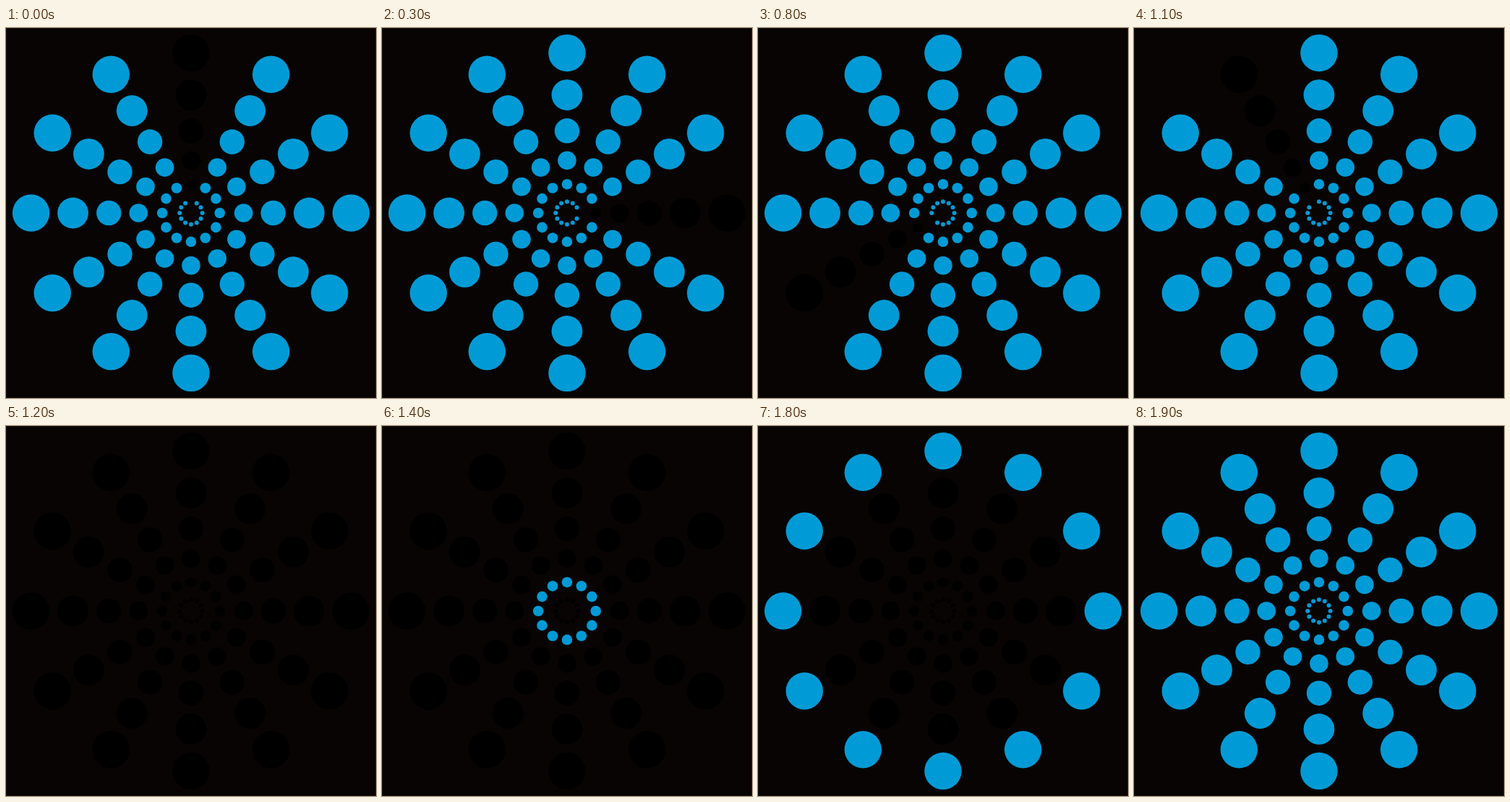
Animation of 512x512 px, one loop 2000 ms. Source, as an HTML page:

```html
<!DOCTYPE html>
<html lang="en">
<head>
<meta charset="utf-8">
<title>Dot rosette</title>
<style>
  html, body { margin: 0; width: 100%; height: 100%; overflow: hidden; background: #080404; }
  svg { display: block; width: 100%; height: 100%; }
</style>
</head>
<body>
<svg id="stage" viewBox="0 0 512 512">
  <rect width="512" height="512" fill="#080404"/>
  <rect x=".5" y=".5" width="511" height="511" fill="none" stroke="#141010"/>
</svg>
<script>
  const SPOKES = 12, STEP = 100, STEPS = 20;
  const LIT = '#009bd6', DARK = '#000';
  // [distance from centre, dot radius], innermost ring first
  const RINGS = [[15.7, 3], [39.8, 7.3], [72.7, 12.8], [113.7, 17.2], [163.4, 21.4], [221.4, 25.7]];

  const stage = document.getElementById('stage');
  const dots = [];

  RINGS.forEach(([dist, r], ring) => {
    for (let spoke = 0; spoke < SPOKES; spoke++) {
      const a = spoke * 2 * Math.PI / SPOKES;
      const el = document.createElementNS('http://www.w3.org/2000/svg', 'circle');
      el.setAttribute('cx', 256 + dist * Math.sin(a));
      el.setAttribute('cy', 256 - dist * Math.cos(a));
      el.setAttribute('r', r);
      stage.append(el);
      dots.push({ el, ring, spoke });
    }
  });

  // A dark spoke goes round once, all go dark, rings light outwards, then all light up.
  function isLit(step, ring, spoke) {
    if (step < SPOKES) return spoke !== step;
    if (step === STEPS - 1) return true;
    return ring === step - SPOKES - 1;
  }

  let shown = -1;
  function render(ms) {
    const step = Math.floor(ms / STEP) % STEPS;
    if (step === shown) return;
    shown = step;
    for (const { el, ring, spoke } of dots) {
      el.setAttribute('fill', isLit(step, ring, spoke) ? LIT : DARK);
    }
  }

  const start = performance.now();
  function tick() {
    render(performance.now() - start);
    requestAnimationFrame(tick);
  }
  tick();
</script>
</body>
</html>
```
